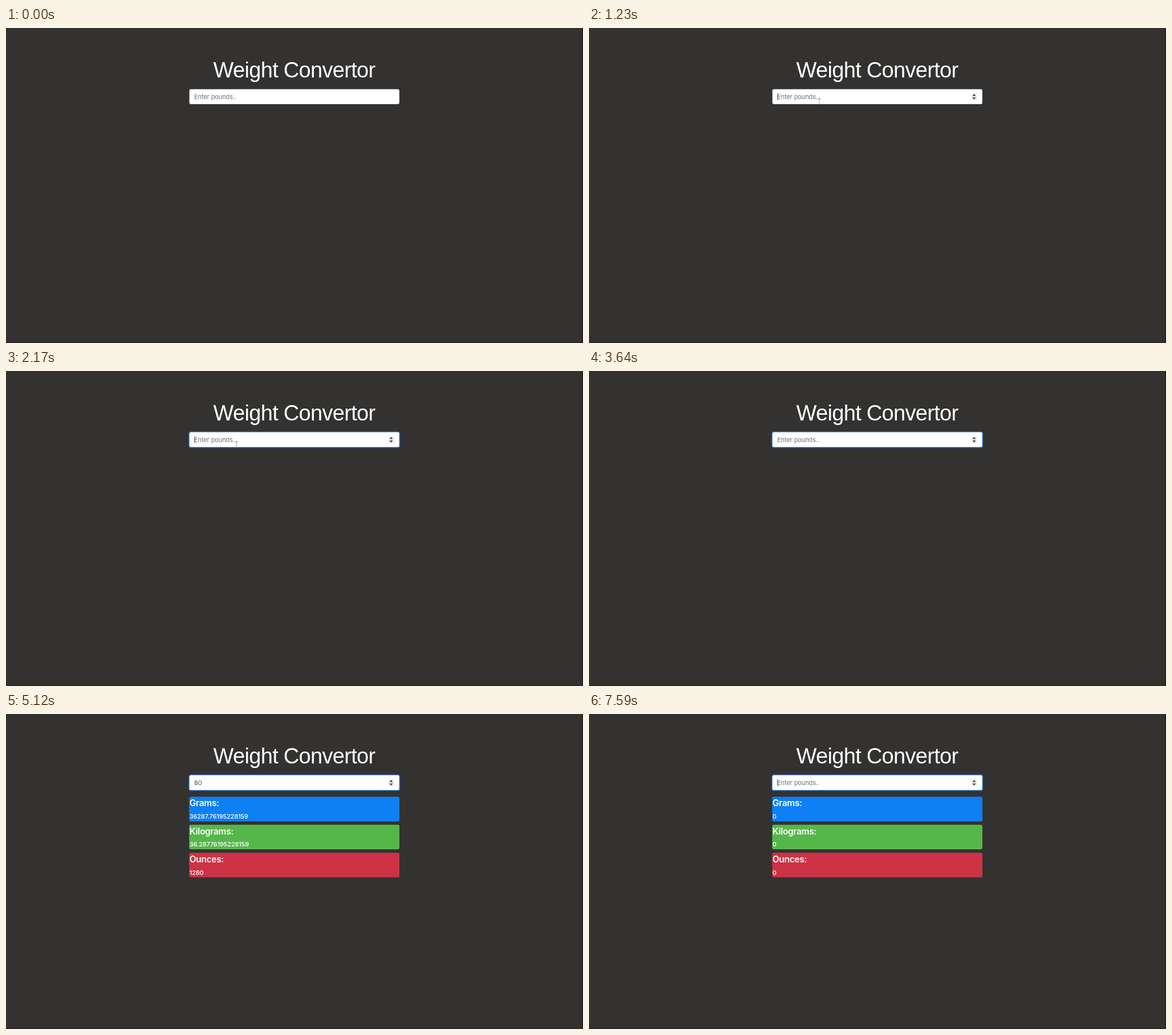
Animation of 1012 by 554 pixels, one loop 8 s. Source, as an HTML page with a canvas:

```html
<!DOCTYPE html>
<html lang="en">
<head>
<meta charset="utf-8">
<title>Weight Convertor</title>
<style>
html, body { margin: 0; width: 100%; height: 100%; overflow: hidden; background: #333230; }
canvas { display: block; width: 1012px; height: 554px; }
</style>
</head>
<body>
<canvas id="stage" width="1012" height="554"></canvas>
<script>
const ctx = document.getElementById('stage').getContext('2d');
const LOOP = 8000;
const SANS = 'Inter, "Liberation Sans", sans-serif';
const FIELD = { x: 321.5, y: 107.5, w: 368.5, h: 26.5 };

// Each entry: start time, typed value, and the three results.
const entries = [
  [0, '', null],
  [4130, '8', ['3628.776195228159', '3.628776195228159', '128']],
  [4630, '80', ['36287.76195228159', '36.28776195228159', '1280']],
  [6800, '8', ['3628.776195228159', '3.628776195228159', '128']],
  [7000, '', ['0', '0', '0']]
];
const cards = [
  ['Grams:', '#0f7ff4'],
  ['Kilograms:', '#55b74a'],
  ['Ounces:', '#cd3245']
];
const caretToggles = [1230, 1670, 2170, 2660, 3050, 3640, 4130, 5120, 5610, 6110, 6610, 7090, 7590];

function text(str, x, y, font, color, spacing = 0, align = 'left') {
  ctx.font = font;
  ctx.fillStyle = color;
  ctx.letterSpacing = spacing + 'px';
  ctx.textAlign = align;
  ctx.fillText(str, x, y);
}

function box(x, y, w, h, r, color) {
  ctx.fillStyle = color;
  ctx.beginPath();
  ctx.roundRect(x, y, w, h, r);
  ctx.fill();
}

function shape(points, fill, stroke) {
  ctx.beginPath();
  points.forEach(([x, y]) => ctx.lineTo(x, y));
  ctx.closePath();
  if (stroke) {
    ctx.lineWidth = 1.4;
    ctx.strokeStyle = stroke;
    ctx.stroke();
  }
  ctx.fillStyle = fill;
  ctx.fill();
}

function pointerAt(t) {
  if (t < 390 || t >= 3140) return null;
  if (t < 470) return { x: 629, y: 79, beam: true };
  const step = t < 720 ? 0 : Math.min(7, Math.floor((t - 720) / 72) + 1);
  const p = step / 7;
  const eased = p * p * (3 - 2 * p);
  const x = 533 - 129 * eased;
  const y = 209 - 81 * eased;
  return { x, y, beam: y < 134 };
}

function drawPointer({ x, y, beam }) {
  if (!beam) {
    const arrow = [[0, 0], [0, 11], [2.6, 8.7], [4.4, 12.7], [6, 12], [4.3, 8.1], [7.8, 8]];
    shape(arrow.map(([dx, dy]) => [x + dx, y + dy]), '#111', '#eee');
    return;
  }
  ctx.fillStyle = y < 100 ? '#b8b8b8' : '#666';
  for (let dy = -3; dy < 5; dy += 2) ctx.fillRect(x - 0.5, y + dy, 1, 1.3);
  ctx.fillRect(x - 2, y - 4, 4, 0.8);
}

function drawField(value, t, hovered) {
  const { x, y, w, h } = FIELD;
  const focus = t < 1330 ? 0 : t < 1410 ? 0.6 : 1;
  if (focus) {
    ctx.globalAlpha = focus;
    box(x - 2, y - 2, w + 4, h + 4, 4.5, '#25436f');
    box(x - 0.8, y - 0.8, w + 1.6, h + 1.6, 3.5, '#3768b2');
    ctx.globalAlpha = 1;
  }
  box(x, y, w, h, 3, '#c9ced3');
  if (focus) {
    ctx.globalAlpha = focus;
    box(x, y, w, h, 3, '#80b5f2');
    ctx.globalAlpha = 1;
  }
  box(x + 0.6, y + 0.6, w - 1.2, h - 1.2, 2.5, '#fff');
  text(value || 'Enter pounds..', 330, 125, '11px ' + SANS, value ? '#495057' : '#6c747b', -0.1);

  if (hovered || t >= 1230) {
    box(670.5, 114.5, 10, 13, 0.5, '#efefef');
    shape([[672.5, 119.5], [678.5, 119.5], [675.5, 116]], '#3c3c3c');
    shape([[672.5, 122.3], [678.5, 122.3], [675.5, 125.8]], '#3c3c3c');
  }
  if (caretToggles.filter(at => at <= t).length % 2 || (t >= 4130 && t < 5120) || (t >= 6610 && t < 7090)) {
    ctx.fillStyle = '#4b5056';
    ctx.fillRect(330.5 + value.length * 7, 114.5, 1, 12.5);
  }
}

function drawCard([label, color], index, result) {
  const y = 145.5 + index * 49.2;
  box(321.3, y, 368.7, 43.4, 3, color);
  text(label, 321.8, y + 16.8, '600 15.5px ' + SANS, '#fff', -0.35);
  text(result, 321.8, y + 38.7, '500 11px ' + SANS, '#fff', -0.15);
}

function render(t) {
  ctx.fillStyle = '#333230';
  ctx.fillRect(0, 0, 1012, 554);
  ctx.fillStyle = '#1c1b1a';
  ctx.fillRect(1010.5, 0, 1.5, 554);
  ctx.fillStyle = '#282726';
  ctx.fillRect(0, 552.5, 1012, 1.5);

  text('Weight Convertor', 505.5, 87.3, '38px "Liberation Sans", Arial, sans-serif', '#fff', -0.7, 'center');

  const [, value, results] = entries.findLast(([start]) => start <= t);
  const pointer = pointerAt(t);
  drawField(value, t, pointer && pointer.beam && pointer.y > 107);
  if (results) cards.forEach((card, i) => drawCard(card, i, results[i]));
  if (pointer) drawPointer(pointer);
}

const started = performance.now();
function tick() {
  render((performance.now() - started) % LOOP);
  requestAnimationFrame(tick);
}
tick();
</script>
</body>
</html>
```
